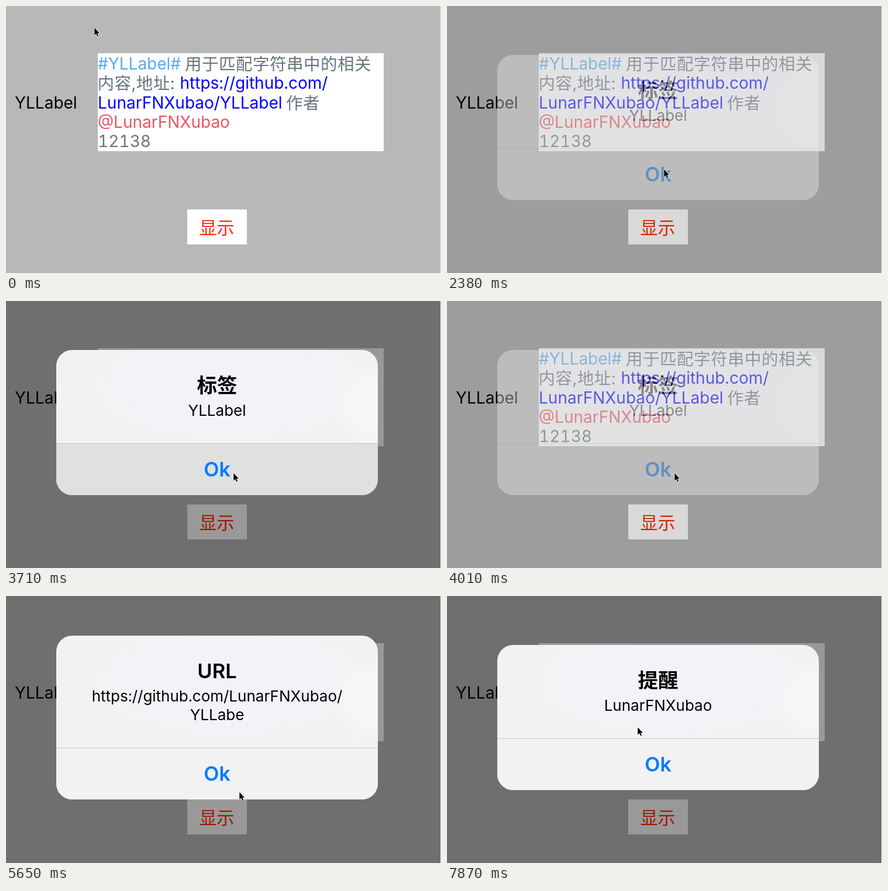
Animation of 744 by 458 pixels, one loop 8000 ms. Source, as an HTML page:

```html
<!DOCTYPE html>
<html lang="zh">
<head>
<meta charset="utf-8">
<title>YLLabel</title>
<style>
  html, body { margin: 0; width: 100%; height: 100%; overflow: hidden; background: #b8b8b8; }
  svg { display: block; width: 744px; height: 458px; }
  text {
    font-family: Inter, "Noto Sans CJK SC", "Noto Sans CJK", sans-serif;
    font-size: 28px;
    font-optical-sizing: none;
    font-variant-numeric: tabular-nums;
  }
  .body { fill: #66757f; }
  .cjk { font-size: 28.5px; letter-spacing: .5px; }
  .tag { fill: #55acee; }
  .url { fill: #00f; }
  .user { fill: #ee5560; }
  .mid { text-anchor: middle; }
  .button { font-size: 30px; fill: #ff2600; }
  .title { font-size: 34.5px; font-weight: 600; }
  .message { font-size: 26px; }
  .ok { font-size: 34px; font-weight: 600; fill: #007aff; }
</style>
</head>
<body>
<svg viewBox="0 0 744 458">
  <defs>
    <radialGradient id="tint">
      <stop offset=".6" stop-color="#f3f2f8"/>
      <stop offset="1" stop-color="#f3f2f8" stop-opacity="0"/>
    </radialGradient>
    <radialGradient id="glow">
      <stop offset=".5" stop-color="#f7f7f8"/>
      <stop offset="1" stop-color="#f7f7f8" stop-opacity="0"/>
    </radialGradient>
    <clipPath id="card"><rect id="cardShape" x="86" width="550" rx="27"/></clipPath>
  </defs>

  <rect width="744" height="458" fill="#b8b8b8"/>
  <text x="15" y="175.5">YLLabel</text>
  <rect x="157" y="81" width="489" height="168" fill="#fff"/>
  <g id="label"></g>
  <rect x="310" y="349" width="102" height="60" fill="#fff"/>
  <text class="button mid" x="360.5" y="391">显示</text>

  <rect id="dim" width="744" height="458"/>
  <rect x="743" width="1" height="458" fill="#eee"/>

  <g id="alert">
    <g clip-path="url(#card)">
      <rect x="86" y="60" width="550" height="300" fill="#f2f2f2"/>
      <ellipse cx="385" cy="146" rx="255" ry="100" fill="url(#tint)"/>
      <circle cx="625" cy="178" r="75" fill="url(#glow)"/>
      <rect id="foot" x="86" width="550" height="89"/>
      <rect id="rule" x="86" width="550" height="1" fill="#c6c6c8"/>
    </g>
    <text id="title" class="title mid" x="361"></text>
    <text id="line1" class="message mid" x="361"></text>
    <text id="line2" class="message mid" x="361"></text>
    <text id="ok" class="ok mid" x="361">Ok</text>
  </g>

  <g id="cursor">
    <path d="M.3 1.2V14.2L3.2 11.5L5.2 16L7.1 15.2L5.2 10.8H9Z"
          stroke="#fff" stroke-width="1.4" stroke-linejoin="round" paint-order="stroke"/>
  </g>
</svg>
<script>
const LOOP = 8000, TICK = 148.6;
const USER = 'LunarFNXubao';
const CX = 361, CY = 208.5;
const $ = id => document.getElementById(id);

// Label runs: line, x, class, text
const runs = [
  [0, 157, 'tag', '#YLLabel#'],
  [0, 306, 'body cjk', '用于匹配字符串中的相关'],
  [1, 156.5, 'body cjk', '内容,地址:'],
  [1, 297.5, 'url', 'https://github.com/'],
  [2, 157, 'url', USER + '/YLLabel'],
  [2, 479, 'body cjk', '作者'],
  [3, 157, 'user', '@' + USER],
  [4, 157, 'body', '12138']
];
for (const [line, x, cls, str] of runs) {
  const el = document.createElementNS('http://www.w3.org/2000/svg', 'text');
  el.setAttribute('class', cls);
  el.setAttribute('x', x);
  el.setAttribute('y', 109 + 33.35 * line + (cls.includes('cjk') ? 1 : 0));
  el.textContent = str;
  $('label').append(el);
}

// Ticks at which each alert opens, is pressed and fades
const alerts = [
  { open: 5, press: 14, fade: 16, title: '标签', text: ['YLLabel'] },
  { open: 22, press: 25, fade: 27, title: '标签', text: ['YLLabel'] },
  { open: 33, press: 42, fade: 43, title: 'URL', text: [`https://github.com/${USER}/`, 'YLLabe'] },
  { open: 50, press: 99, fade: 99, title: '提醒', text: [USER] }
];
const FADE_IN = [.08, .62, .95], FADE_OUT = [.37, .04];

// Pointer path: tick, x, y
const path = [
  [0, 151, 36], [2, 217, 96], [7, 217, 96], [9, 290, 160], [10, 290, 160],
  [12, 362, 272], [13, 371, 279], [16, 371, 279], [18, 266, 143], [20, 243, 94],
  [22, 243, 94], [25, 389, 294], [27, 389, 294], [29, 380, 215], [31, 358, 135],
  [34, 358, 135], [36, 369, 242], [38, 399, 335], [41, 399, 335], [42, 382, 326],
  [45, 382, 326], [47, 300, 225], [49, 262, 195], [51, 262, 195], [53, 326, 224]
];

function pointerAt(n) {
  const i = path.findIndex(k => k[0] >= n);
  if (i <= 0) return path[0].slice(1);
  const [n0, x0, y0] = path[i - 1], [n1, x1, y1] = path[i];
  const f = (n - n0) / (n1 - n0);
  return [x0 + (x1 - x0) * f, y0 + (y1 - y0) * f];
}

function put(id, attrs) {
  for (const k in attrs) $(id).setAttribute(k, attrs[k]);
}

function write(id, y, str = '') {
  $(id).textContent = str;
  put(id, { y });
}

function drawAlert(n) {
  const a = alerts.findLast(a => n >= a.open);
  const leaving = a && n >= a.fade;
  const p = !a ? 0 : leaving ? FADE_OUT[n - a.fade] ?? 0 : FADE_IN[n - a.open] ?? 1;
  put('dim', { opacity: .4 * p });
  put('alert', { opacity: p });
  if (!p) return;

  const height = a.text.length > 1 ? 281 : 249;
  const top = CY - height / 2, rule = Math.round(top + height - 89);
  const scale = leaving ? 1 : 1.2 - .2 * p;
  put('alert', { transform: `translate(${CX} ${CY}) scale(${scale}) translate(${-CX} ${-CY})` });
  put('cardShape', { y: top, height });
  put('rule', { y: rule });
  put('foot', { y: rule, fill: n >= a.press && !leaving ? '#e0e0e0' : '#f2f2f2' });
  write('title', top + 73, a.title);
  write('line1', top + 112.5, a.text[0]);
  write('line2', top + 144.5, a.text[1]);
  put('ok', { y: rule + 57 });
}

function draw(t) {
  const n = Math.floor((t + 10) / TICK);
  drawAlert(n);
  const [x, y] = pointerAt(n);
  put('cursor', { transform: `translate(${x} ${y})` });
}

const start = performance.now();
function tick() {
  draw((performance.now() - start) % LOOP);
  requestAnimationFrame(tick);
}
tick();
</script>
</body>
</html>
```
